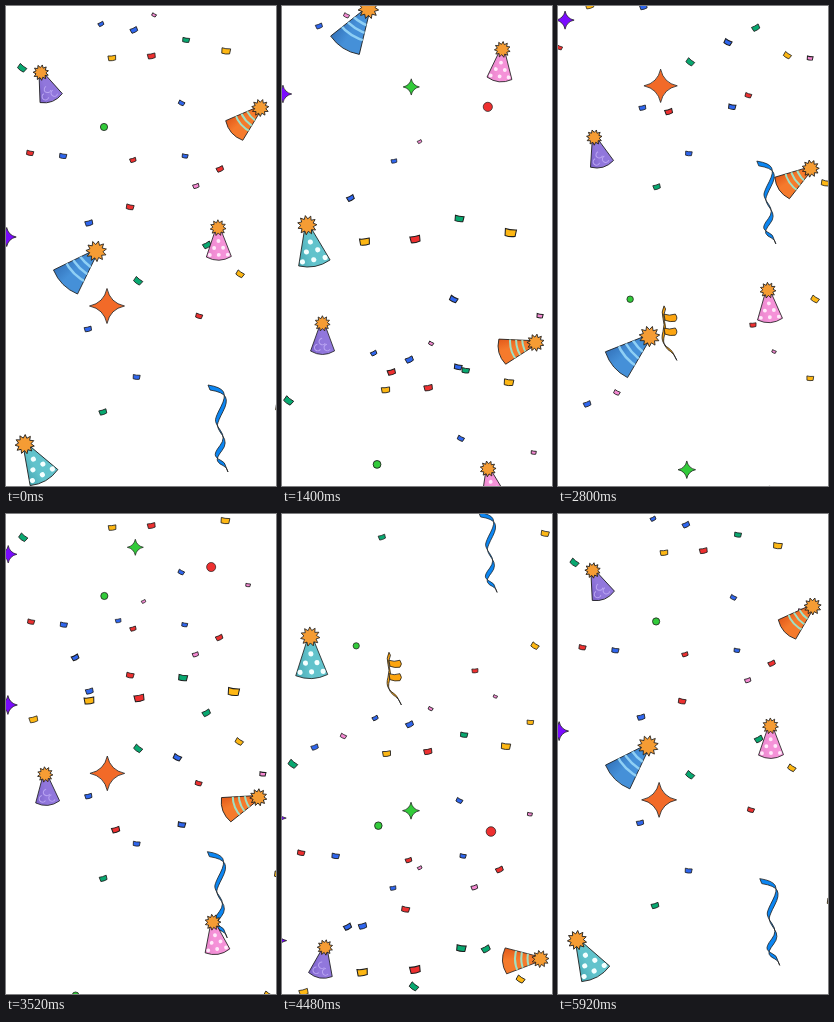
Write an HTML page with a canvas that moves like this. It is 270x480 px and loops after 5.96 s.

```html
<!DOCTYPE html>
<html lang="en">
<head>
<meta charset="utf-8">
<title>Party confetti</title>
<style>
  html, body { margin: 0; width: 100%; height: 100%; overflow: hidden; background: #fff; }
  canvas { display: block; width: 100vw; height: 100vh; }
</style>
</head>
<body>
<canvas id="stage"></canvas>
<script>
const W = 270, H = 480, LOOP = 5960, STEP = 40;
const canvas = document.getElementById('stage');
const ctx = canvas.getContext('2d');
const ratio = window.devicePixelRatio || 1;
canvas.width = W * ratio;
canvas.height = H * ratio;

const INK = '#1d1d1d';
const BLUE = '#2f66ee', RED = '#ee3030', GOLD = '#fdb714', GREEN = '#08a870', PINK = '#f58ad3';
const LIME = '#32cb3a', VIOLET = '#7a0bff';

// Moments at which each falling copy passes its rest position
const SHEET_STARTS = [0, 3684, 5977];
const HAT_STARTS = [0, 2437, 5977];

const LENGTH = { [BLUE]: 6.3, [RED]: 6.6, [GOLD]: 8, [GREEN]: 7, [PINK]: 5.4 };

// This cluster falls twice: once as it is, once enlarged and ahead of the rest
const CLUSTER = {
  [BLUE]: [[95, 18], [175.5, 97], [179, 150]],
  [RED]: [[145.5, 50], [127, 154]],
  [GOLD]: [[106, 52], [220, 45]],
  [GREEN]: [[180, 34]],
  [PINK]: [[243, 110]]
};
const LOOSE = {
  [BLUE]: [[128, 24], [57, 150], [83, 217], [82, 323], [130.5, 371], [24, 634], [109, 787]],
  [RED]: [[24, 147], [214, 163], [124, 201], [193, 310], [198, 551], [-24, 950]],
  [GOLD]: [[234, 268], [274, 402], [263, 524], [258, 607], [12, 900]],
  [GREEN]: [[16, 62], [201, 239], [132, 275], [97, 406]],
  [PINK]: [[148, 9], [190, 180], [220, 579], [55, 622], [138, 765]]
};

// Place and angle at rest; v, spin and drift are per millisecond
const HATS = [
  { x: 40.5, y: 80.5, v: 0.18, turn: -22, spin: 0.0155, len: 30, half: 12, ball: 7.2,
    fill: '#9177dc', shade: '#7a60c8', mark: '#b9a4f2', deco: swirls },
  { x: 240.3, y: 114, v: 0.1625, turn: 49, spin: 0.0185, drift: -0.01, bend: 4.8e-6, len: 37, half: 13, ball: 8,
    fill: '#f57a2c', shade: '#e2591a', mark: '#9fe0c4', deco: stripes },
  { x: 74, y: 261.5, v: 0.231, turn: 45, spin: 0.012, len: 46, half: 17, ball: 9.6,
    fill: '#4590d8', shade: '#3474bc', mark: '#8fd0f5', deco: stripes },
  { x: 212.5, y: 237.5, v: 0.172, turn: -1.5, spin: -0.007, drift: -0.0045, bend: 1.5e-6, len: 31.5, half: 12.5, ball: 7.4,
    fill: '#f592d8', shade: '#e684ca', mark: '#ffe9fa', deco: dots },
  { x: 29, y: 456, v: 0.209, turn: -30, spin: -0.0185, len: 41, half: 16, ball: 9,
    fill: '#62c3cc', shade: '#48a9b4', mark: '#f4ffff', deco: dots }
];

const travel = a => (0.231 + 2.2e-6 * Math.abs(a)) * a;
const zoom = a => Math.exp(5.5e-5 * a);

function noise(x, y) {
  const n = Math.sin(x * 12.9898 + y * 78.233) * 43758.5453;
  return n - Math.floor(n);
}

function at(x, y, draw, deg = 0, scale = 1) {
  ctx.save();
  ctx.translate(x, y);
  ctx.rotate(deg * Math.PI / 180);
  ctx.scale(scale, scale);
  draw();
  ctx.restore();
}

function paint(fill, line = 0.8) {
  ctx.fillStyle = fill;
  ctx.fill();
  ctx.strokeStyle = INK;
  ctx.lineWidth = line;
  ctx.stroke();
}

function paper(x, y, fill) {
  const a = LENGTH[fill] * (0.4 + 0.2 * noise(x, y)), b = a * 0.62;
  at(x, y, () => {
    ctx.beginPath();
    ctx.moveTo(-a, -b);
    ctx.quadraticCurveTo(-a * 0.2, -b * 0.7, a, -b);
    ctx.lineTo(a * 0.9, b * 0.9);
    ctx.quadraticCurveTo(0, b * 1.3, -a * 0.9, b);
    ctx.closePath();
    paint(fill);
  }, 70 * noise(y, x) - 30);
}

function scatter(group) {
  for (const fill in group) {
    for (const [x, y] of group[fill]) paper(x, y, fill);
  }
}

function disc(x, y, r, fill) {
  ctx.beginPath();
  ctx.arc(x, y, r, 0, 7);
  paint(fill);
}

function star(x, y, r, fill) {
  at(x, y, () => {
    ctx.beginPath();
    ctx.moveTo(0, -r);
    for (let i = 1; i <= 4; i++) {
      const n = i * Math.PI / 2, q = n - Math.PI / 4, c = r * 0.25;
      ctx.quadraticCurveTo(Math.sin(q) * c, -Math.cos(q) * c, Math.sin(n) * r, -Math.cos(n) * r);
    }
    paint(fill);
  });
}

// Smooth curve continuing the current path
function curve(pts) {
  ctx.lineTo(...pts[0]);
  for (let i = 1; i < pts.length - 1; i++) {
    const [x, y] = pts[i], [nx, ny] = pts[i + 1];
    const w = i === pts.length - 2 ? 1 : 0.5;
    ctx.quadraticCurveTo(x, y, x + (nx - x) * w, y + (ny - y) * w);
  }
}

// Paper strip swept by a slanted edge, thin where it runs along that edge
function strip(pts, dx, dy, fill) {
  ctx.beginPath();
  curve(pts);
  curve(pts.map(([x, y]) => [x + dx, y + dy]).reverse());
  ctx.closePath();
  ctx.lineJoin = 'round';
  paint(fill);
}

function ribbon() {
  strip([[0, 0], [13, 2], [18, 12], [8, 31], [7, 38], [18, 53], [6, 68], [9, 74], [17, 77], [18, 82]], 2, 5, '#0c86f2');
}

function spiral() {
  const gold = '#fca510';
  strip([[1, 0], [-2, 6], [2, 18], [-2, 32], [3, 40], [9, 43], [12, 50]], 1.5, 3, gold);
  for (const y of [8, 21.5]) {
    ctx.beginPath();
    ctx.moveTo(1, y);
    ctx.quadraticCurveTo(6, y + 2, 12, y);
    ctx.quadraticCurveTo(15, y + 4, 12, y + 7);
    ctx.quadraticCurveTo(7, y + 8, 2, y + 6);
    ctx.closePath();
    paint(gold);
  }
}

function sheet(a) {
  const k = zoom(a);
  at(W / 2 * (1 - k), travel(a), () => {
    scatter(CLUSTER);
    at(-78, 803, () => scatter(CLUSTER), 0, 1.45);
    scatter(LOOSE);
    disc(98, 121, 3.6, LIME);
    disc(69, 524, 3.4, LIME);
    disc(215.3, 725.6, 5.2, RED);
    star(101, 300, 17.5, '#f26a28');
    star(128.5, 703, 9.2, LIME);
    star(0.7, 231, 9.5, VIOLET);
    star(-17, 711, 10, VIOLET);
    at(202, 379, ribbon);
    at(103.5, 531, spiral, 0, 1.08);
  }, 0, k);
}

function stripes({ len, half, mark }) {
  ctx.strokeStyle = mark;
  ctx.lineWidth = len * 0.055;
  for (let f = -0.18; f < 0.2; f += 0.17) {
    const y = len * f;
    ctx.beginPath();
    ctx.moveTo(-half, y - 2);
    ctx.quadraticCurveTo(0, y + 4, half, y - 2);
    ctx.stroke();
  }
}

function dots({ len, half, mark }) {
  ctx.fillStyle = mark;
  for (let row = 0; row < 3; row++) {
    for (let i = 0; i <= row; i++) {
      ctx.beginPath();
      ctx.arc((i - row / 2) * half * 0.72, (row * 0.22 - 0.08) * len, len * 0.062, 0, 7);
      ctx.fill();
    }
  }
}

function swirls({ len, half, mark }) {
  ctx.strokeStyle = mark;
  ctx.lineWidth = 1;
  for (let i = -1; i <= 1; i++) {
    ctx.beginPath();
    ctx.arc(i * half * 0.4, (0.1 + 0.2 * Math.abs(i)) * len, len * 0.11, 0.6, 4.6);
    ctx.stroke();
  }
}

function burst(y, r) {
  const n = 11;
  ctx.beginPath();
  for (let i = 0; i < n * 2; i++) {
    const p = i * Math.PI / n, d = i % 2 ? r * 0.7 : r * 1.08;
    ctx.lineTo(Math.sin(p) * d, y - Math.cos(p) * d);
  }
  ctx.closePath();
  paint('#f59c34');
}

function hat(kind, h) {
  const { len, half, drift = 0, bend = 0 } = kind;
  at(kind.x + drift * h + bend * h * h, kind.y + kind.v * h, () => {
    const top = -len / 2, low = len / 2 - 2.5;
    ctx.beginPath();
    ctx.moveTo(-2, top);
    ctx.lineTo(-half, low);
    ctx.quadraticCurveTo(0, low + 7, half, low);
    ctx.lineTo(2, top);
    ctx.closePath();
    const tone = ctx.createLinearGradient(-half, 0, half, 0);
    tone.addColorStop(0, kind.shade);
    tone.addColorStop(0.45, kind.fill);
    paint(tone);
    ctx.save();
    ctx.clip();
    kind.deco(kind);
    ctx.restore();
    burst(top, kind.ball);
  }, kind.turn + kind.spin * h);
}

const began = performance.now();

function frame() {
  const t = Math.floor((performance.now() - began) % LOOP / STEP) * STEP;
  ctx.setTransform(ratio, 0, 0, ratio, 0, 0);
  ctx.fillStyle = '#fff';
  ctx.fillRect(0, 0, W, H);
  SHEET_STARTS.forEach(s => sheet(t - s));
  HAT_STARTS.forEach(s => HATS.forEach(kind => hat(kind, t - s)));
  requestAnimationFrame(frame);
}
frame();
</script>
</body>
</html>
```
